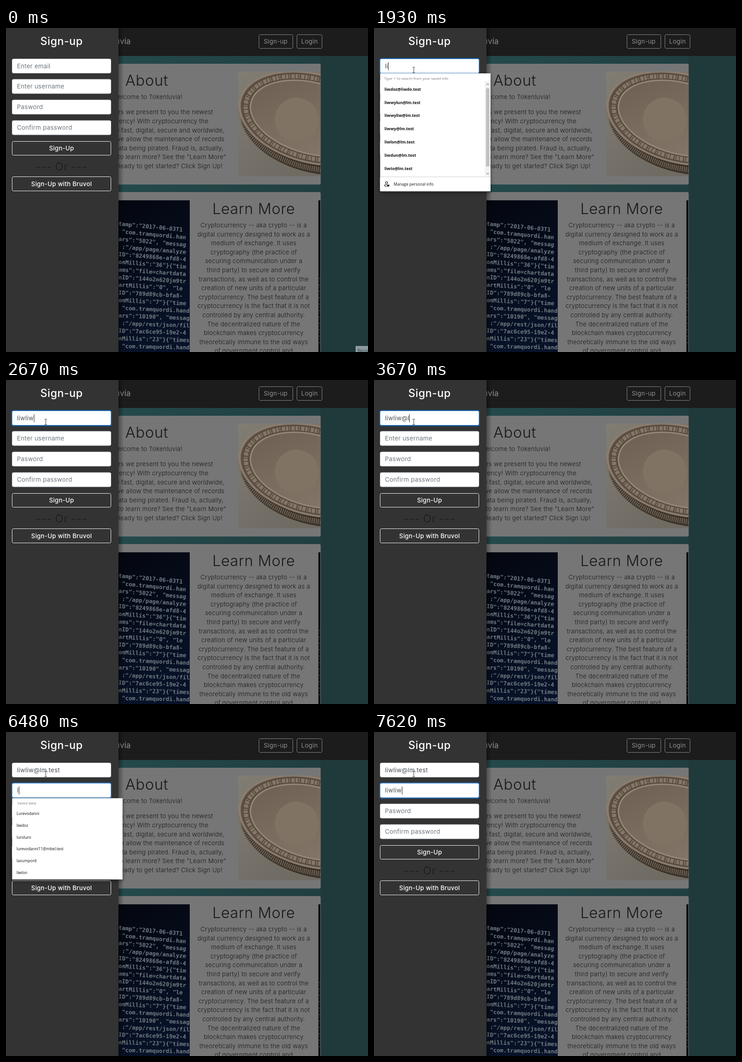
These frames come from a looping animation (792 by 707 pixels, 8000 ms). An HTML page:

```html
<!DOCTYPE html>
<html lang="en">
<head>
<meta charset="utf-8">
<title>Sign-up form</title>
<style>
  html, body { margin: 0; width: 100%; height: 100%; overflow: hidden; background: #333; }
  svg { display: block; width: 792px; height: 707px; }
  text { font: 400 13.4px Inter, "Open Sans", sans-serif; letter-spacing: .02em; white-space: pre; }
  .small { font-family: "Open Sans", "Noto Sans", sans-serif; letter-spacing: 0; }
  .code { font-family: "DejaVu Sans Mono", monospace; letter-spacing: 0; }
</style>
</head>
<body>
<svg viewBox="0 0 792 707">
  <defs>
    <linearGradient id="teal"><stop offset=".3" stop-color="#244a4c"/><stop offset="1" stop-color="#203c3d"/></linearGradient>
    <linearGradient id="edge"><stop stop-color="#000" stop-opacity=".35"/><stop offset="1" stop-color="#000" stop-opacity="0"/></linearGradient>
    <linearGradient id="table" x2=".6" y2="1"><stop stop-color="#827d74"/><stop offset="1" stop-color="#6f6a62"/></linearGradient>
    <linearGradient id="face" x2="1" y2=".7"><stop stop-color="#6d5f50"/><stop offset="1" stop-color="#85776a"/></linearGradient>
    <linearGradient id="navy" x2=".3" y2="1"><stop stop-color="#03060f"/><stop offset="1" stop-color="#081228"/></linearGradient>
    <clipPath id="coinClip"><path d="M508 95h180v228h-180z"/></clipPath>
    <clipPath id="codeClip"><path d="M246 376h156v331h-156z"/></clipPath>
    <filter id="shadow" x="-20%" y="-20%" width="140%" height="140%"><feDropShadow dx="0" dy="3" stdDeviation="5" flood-opacity=".45"/></filter>
  </defs>
  <g id="page"></g>
  <g id="live"></g>
</svg>
<script>
const page = document.getElementById('page'), live = document.getElementById('live');
const LOOP = 8000, BLINK = 530;
const LEAD = 20; // a drawn frame reaches the screen about one refresh later

const rect = (x, y, w, h, fill, extra = '') =>
  `<rect x="${x}" y="${y}" width="${w}" height="${h}" fill="${fill}" ${extra}/>`;
const text = (str, x, y, { size = 13.4, fill = '#17191b', anchor = 'start', weight = 400, cls = '', extra = '' } = {}) =>
  `<text x="${x}" y="${y}" class="${cls}" fill="${fill}" text-anchor="${anchor}" style="font-size:${size}px;font-weight:${weight}" ${extra}>${str}</text>`;
const middle = (str, x, y, o) => text(str, x, y, { anchor: 'middle', ...o });
const small = (str, x, y, o) => text(str, x, y, { size: 8.6, cls: 'small', fill: '#111', ...o });
const outline = (x, y, w, h, color) => rect(x, y, w, h, 'none', `stroke="${color}" rx="3"`);

// ---------- still page ----------
function coin() {
  const ring = (rx, ry, fill, extra = '') =>
    `<ellipse rx="${rx}" ry="${ry}" fill="${fill}" transform="translate(670 197) rotate(15)" ${extra}/>`;
  return `<g clip-path="url(#coinClip)">
    ${rect(508, 95, 180, 228, 'url(#table)')}
    <g transform="translate(5 20)">${ring(165, 98, '#3b3229')}</g>
    <g transform="translate(3 11)">${ring(164, 97, 'none', 'stroke="#75685a" stroke-width="11" stroke-dasharray="2 2.5"')}</g>
    ${ring(165, 98, '#8b7d6e')}
    ${ring(160, 94, '#5b4e41')}
    ${ring(149, 86, 'none', 'stroke="#857769" stroke-width="9" stroke-dasharray="5 2 2 3 7 2"')}
    ${ring(140, 79, '#95887a')}
    ${ring(137, 76, 'url(#face)')}
    <circle cx="636" cy="200" r="48" fill="#817364"/></g>`;
}

function codePhoto() {
  const lines = [
    'tamp":"2017-06-03T1', ' "com.tramquordi.han', 'ars":"5022", "messag', ' :"/app/page/analyze',
    'ID":"8249868e-afd8-4', 'onMillis":"36"}{"tim', 'ams":"file=chartdata', 'nID":"144o2n620jm9tr',
    'artMillis":"0", "le', 'ID":"789d89cb-bfa8-', 'onMillis":"7"}{"time', ' "com.tramquordi.hand',
    'ars":"10190", "messag', ' :"/app/rest/json/fil', 'ID":"7ac6ce95-19e2-4', 'nMillis":"23"}{"times', ' "com.tramquordi.hand'];
  return `<g clip-path="url(#codeClip)">${rect(246, 376, 156, 331, 'url(#navy)')}${lines.map((line, i) => {
    const y = 431 + 16.7 * i;
    return text(line, 246, y, { size: 12.3, weight: 700, cls: 'code', fill: '#707c83',
      extra: `transform="rotate(${5.5 - .27 * i} 246 ${y})"` });
  }).join('')}</g>`;
}

function drawPage() {
  const about = [
    ['Welcome to Tokenluvia!', 386, 155], ['To all our users we present to you the newest', 453, 188],
    ['cryptocurrency! With cryptocurrency the', 443, 208], ['payments are fast, digital, secure and worldwide,', 478, 227.5],
    ['while we allow the maintenance of records', 478, 247], ['without data being pirated. Fraud is, actually,', 476, 267],
    ['rare. Want to learn more? See the "Learn More"', 482, 286], ['page. Ready to get started? Click Sign Up!', 474, 306]];
  const learn = ['Cryptocurrency -- aka crypto -- is a', 'digital currency designed to work as a',
    'medium of exchange. It uses', 'cryptography (the practice of', 'securing communication under a',
    'third party) to secure and verify', 'transactions, as well as to control the',
    'creation of new units of a particular', 'cryptocurrency. The best feature of a',
    'cryptocurrency is the fact that it is not', 'controlled by any central authority.',
    'The decentralized nature of the', 'blockchain makes cryptocurrency',
    'theoretically immune to the old ways', 'of government control and'];
  const white = { fill: '#fff', weight: 500 }, dim = { fill: '#919191' }, light = { weight: 300 };
  page.innerHTML =
    rect(0, 0, 792, 707, 'url(#teal)') + rect(688, 61, 104, 646, '#1f3a3b') + rect(0, 0, 792, 61, '#1c1c1c') +
    text('Tokenluvia', 273, 34.5, { size: 16.7, anchor: 'end', ...dim }) +
    outline(553.5, 14.5, 74, 30, '#868686') + middle('Sign-up', 590, 34, dim) +
    outline(636.5, 14.5, 55, 30, '#868686') + middle('Login', 664, 34, dim) +
    rect(200, 78, 488.5, 263.5, '#767676', 'rx="3"') +
    middle('About', 308, 126, { size: 33, ...light }) +
    about.map(([line, x, y]) => text(line, x, y, { anchor: 'end', ...light })).join('') + coin() +
    rect(200, 358, 488.5, 360, '#767676', 'rx="3"') + codePhoto() +
    rect(683.5, 376, 4, 331, '#05080f') +
    `<path d="M686 545V690" stroke="#59646a" stroke-dasharray="3 4 1 6"/>` +
    middle('Learn More', 542, 406, { size: 32.6, ...light }) +
    learn.map((line, i) => middle(line, 542, 435 + 19.6 * i, light)).join('') +
    rect(246, 0, 12, 707, 'url(#edge)') + rect(0, 0, 246, 707, '#333') +
    middle('Sign-up', 121.5, 36.5, { ...white, size: 23.6 }) +
    outline(13.5, 247.5, 216, 30, '#f2f2f2') + middle('Sign-Up', 121.5, 267, white) +
    middle('--- Or ---', 121.5, 311, { size: 24, fill: '#1f2225' }) +
    outline(13.5, 324.5, 216, 31, '#f2f2f2') + middle('Sign-Up with Bruvol', 121.5, 344.5, white);
}

// ---------- form ----------
const clamp = v => Math.max(0, Math.min(1, v));
const email = {
  y: 67.5, hint: 'Enter email', value: 'liwliw@lm.test', focus: 930, blur: 4940, opens: 930, fade: [2470, 2740],
  keys: [1740, 1930, 2070, 2330, 2470, 2600, 3340, 3670, 3870, 4000, 4270, 4470, 4600, 4740],
  saved: ['lurevodanni11@mbel.test', 'liwdoz@liwdo.test', 'liwwylun@lm.test', 'luro@lur.test',
    'luroluro@lur.test', 'liwwyliw@lm.test', 'liwwy@lm.test', 'liwlon@lm.test',
    'liwdun@lm.test', 'liwto@lm.test', 'liwkes@lm.test']
};
const user = {
  y: 112, hint: 'Enter username', value: 'liwliw', focus: 4940, blur: Infinity, opens: 6480, fade: [7420, 7620],
  keys: [6480, 6680, 6880, 7150, 7420, 7550],
  saved: ['Lurevodanni', 'liwdoz', 'luroluro', 'lurevodanni11@mbel.test', 'laxumpord', 'liwlon',
    'liwliw', 'liwwy', 'liwto', 'liwkes']
};
const password = { y: 157, hint: 'Pasword' }, confirmation = { y: 202, hint: 'Confirm password' };
const typedCount = (f, t) => f.keys ? f.keys.filter(k => k <= t).length : 0;

function field(f, t) {
  const n = typedCount(f, t), y = f.y;
  const glow = f.keys ? clamp((t - f.focus) / 140) * (1 - clamp((t - f.blur) / 140)) : 0;
  let out = rect(11, y - 2.5, 221, 36.5, '#1b4a78', `rx="5" opacity="${glow}"`) +
    rect(13.5, y, 216, 31, '#fff', 'rx="3" stroke="#ced4da"') +
    rect(13.5, y, 216, 31, 'none', `rx="3" stroke="#66a9ec" opacity="${glow}"`);
  if (!n) out += text(f.hint, 24, y + 20, { fill: '#6c757d' });
  else out += text(f.value.slice(0, n), 24, y + 20, { fill: '#495057', extra: t < f.blur ? 'id="typed"' : '' });
  const last = n ? f.keys[n - 1] : f.focus;
  if (t >= f.focus && t < f.blur && Math.floor((t - last) / BLINK) % 2 === 0)
    out += rect(24, y + 7, 1, 17.5, '#222', 'id="caret"');
  return out;
}

function matches(f, t) {
  const prefix = f.value.slice(0, Math.min(4, typedCount(f, t)));
  return f.saved.filter(s => s.toLowerCase().startsWith(prefix));
}

const panel = (f, t, top, bottom, body) => t < f.opens || t >= f.fade[1] ? '' :
  `<g opacity="${1 - clamp((t - f.fade[0] + 50) / (f.fade[1] - f.fade[0]))}">
    ${rect(13.5, top, 241.5, bottom - top, '#fff', 'filter="url(#shadow)"')}${body}</g>`;

function emailMenu(t) {
  const all = matches(email, t), rows = all.slice(0, 7), line = 122.7 + 28.8 * rows.length;
  let body = small("Type '/' to search from your saved info", 22.5, 112.5, { size: 7.9, fill: '#767676' }) +
    rows.map((s, i) => small(s, 23, 136.7 + 28.8 * i, { size: 8.8, weight: 700 })).join('') +
    rect(13.5, line, 241.5, 1, '#cfcfcf') + small('Manage personal info', 43, line + 20) +
    `<g transform="translate(28 ${line + 16.5})" fill="none" stroke="#222" stroke-width="1.1">
      <circle cx="-.5" cy="-3" r="2.4"/><path d="M0 1.5h-5q0 4 5 4"/>${rect(.5, 1, 5, 4, '#222', 'stroke="none"')}</g>`;
  if (all.length > 7)
    body += rect(242.5, 116, 12.5, line - 116, '#f1f1f1') +
      rect(245, 131, 7.5, 196 * 7 / all.length, '#c1c1c1', 'rx="3.5"') +
      `<path d="M246.3 124l2.5-2.5 2.5 2.5M246.3 316.5l2.5 2.5 2.5-2.5" fill="none" stroke="#444"/>`;
  return panel(email, t, 99, line + 32, body);
}

function userMenu(t) {
  const rows = matches(user, t).slice(0, 6);
  return panel(user, t, 144.5, 167.5 + 25.7 * rows.length,
    small('Saved data', 25, 158, { size: 8, fill: '#767676' }) +
    rows.map((s, i) => small(s, 23, 181.2 + 25.7 * i)).join(''));
}

// ---------- pointer ----------
function pointer(t) {
  if (t < 70) return rect(765.5, 694.5, 30, 16, '#8c999e', 'stroke="#a5b0b4"') +
    small('Record', 769, 707, { size: 9, fill: '#33434c' });
  const step = Math.min(10, Math.floor((t - 70) / 66) + 1), p = 1 - (1 - step / 10) ** 2;
  const x = 800 - 713 * p, y = 715 - 624 * p;
  const overField = x < 230 && y < 99;
  const click = t >= 930 && t < 1060 ? `<circle cx="85" cy="89" r="8.5" fill="#f3d32a" opacity=".85"/>` : '';
  return click + `<g transform="translate(${x} ${y})">` + (overField
    ? `<path d="M-2.5-5.5h2l.5.5.5-.5h2M0-5V6M-2.5 6.5h2L0 6l.5.5h2" fill="none" stroke="#333"/>`
    : `<path d="M0 0v13l3-3 2 5 2-1-2-4.5h4z" fill="#fff" stroke="#111" stroke-width=".8"/>`) + '</g>';
}

function draw(t) {
  live.innerHTML = [email, user, password, confirmation].map(f => field(f, t)).join('') +
    emailMenu(t) + userMenu(t) + pointer(t);
  const caret = document.getElementById('caret'), typed = document.getElementById('typed');
  if (caret && typed) caret.setAttribute('x', Math.round(24 + typed.getComputedTextLength()));
}

function tick() {
  draw((performance.now() - start + LEAD) % LOOP);
  requestAnimationFrame(tick);
}

const start = performance.now();
drawPage();
tick();
</script>
</body>
</html>
```
